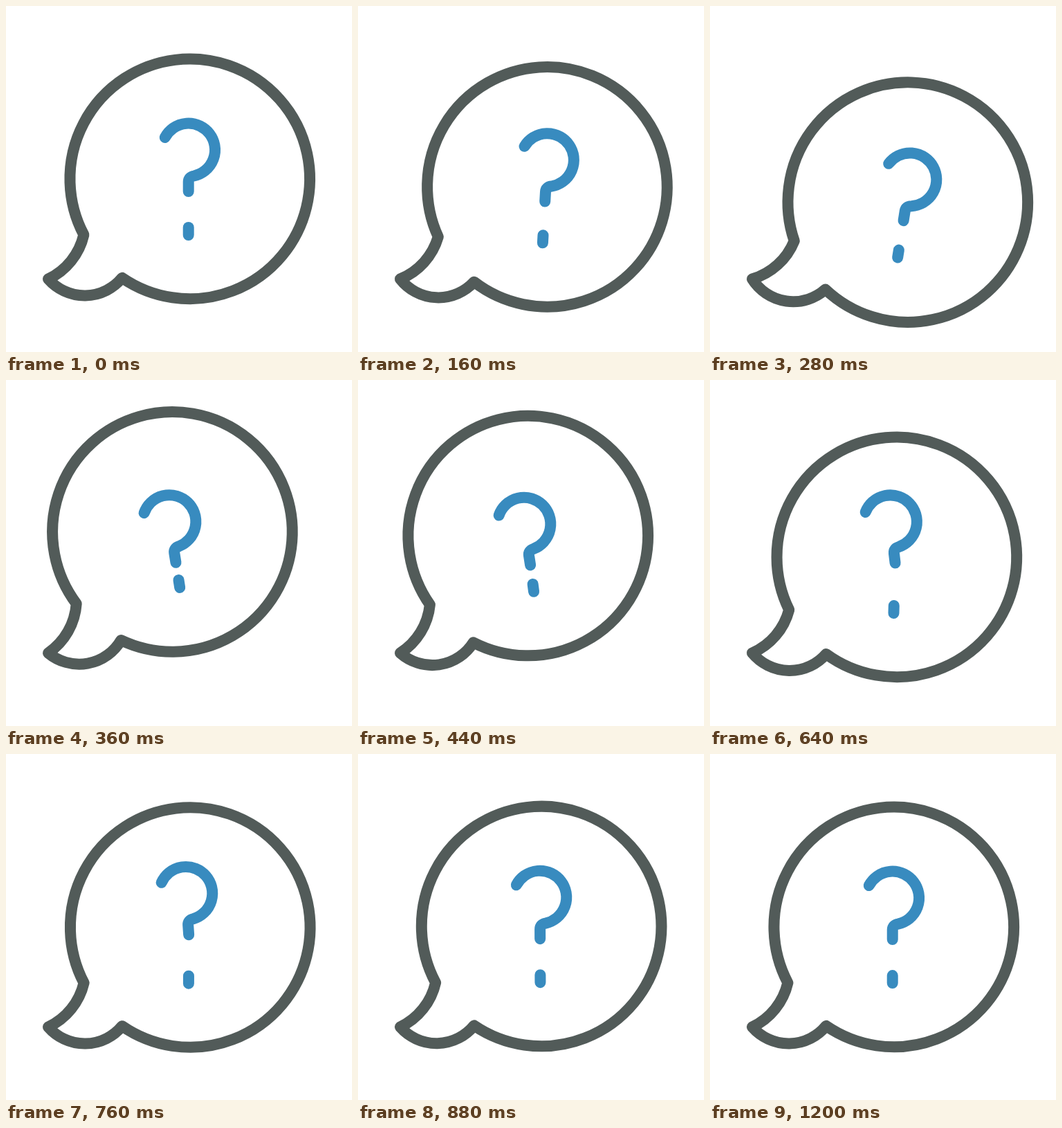
An HTML page for the animation above (1.48 s loop, 500 px wide and 500 px high).

```html
<!DOCTYPE html>
<html lang="en">
<head>
<meta charset="utf-8">
<title>Question bubble</title>
<style>
  html, body { margin: 0; width: 100%; height: 100%; overflow: hidden; background: #fff; }
  svg { display: block; width: 100vw; height: 100vh; }
  path { fill: none; stroke-width: 16; stroke-linecap: round; stroke-linejoin: round; }
  .outline { stroke: #525b59; }
  .mark { stroke: #388bbf; }
</style>
</head>
<body>
<svg viewBox="0 0 500 500">
  <g id="bubble">
    <path class="outline" d="M112.4 330.6A173.3 173.3 0 1 1 167.8 392.8A70 70 0 0 1 61 394.5A94 94 0 0 0 112.4 330.6Z"/>
    <path class="mark" d="M263.7 320V331"/>
    <path class="mark" id="hook" d="M229.7 190A38.4 38.4 0 1 1 271.7 245.5Q263.7 247 263.7 254V268"/>
  </g>
</svg>
<script>
const LOOP = 1480, STEP = 40;
const bubble = document.getElementById('bubble');
const hook = document.getElementById('hook');

// Progress from 0 to 1 between two times, plain and eased
const linear = (t, from, to) => Math.min(1, Math.max(0, (t - from) / (to - from)));
const ramp = (t, from, to) => {
  const u = linear(t, from, to);
  return u * u * (3 - 2 * u);
};

// The bubble winds up, snaps back, then swings out around its tail
function swing(t) {
  if (t < 280) return 9 * ramp(t, 80, 280);
  if (t < 400) return 20.3 * (1 - linear(t, 280, 400)) ** 2 - 11.3;
  const x = t - 400;
  return -11.3 * Math.exp(-x / 127) * Math.cos(2 * Math.PI * x / 512);
}

// The hook slides towards its dot, rebounds and settles
const drop = t => 9 * ramp(t, 80, 280) + 19.5 * ramp(t, 280, 380)
  - 40 * ramp(t, 380, 680) + 11.5 * ramp(t, 680, 880);
const tilt = t => 8.5 * (ramp(t, 660, 860) - ramp(t, 360, 660));

function draw(now) {
  const t = Math.floor(now % LOOP / STEP) * STEP;
  bubble.setAttribute('transform', `rotate(${swing(t)} 61 394.5)`);
  hook.setAttribute('transform', `translate(0 ${drop(t)}) rotate(${tilt(t)} 263.7 268)`);
}

const start = performance.now();
function tick() {
  draw(performance.now() - start);
  requestAnimationFrame(tick);
}
tick();
</script>
</body>
</html>
```
